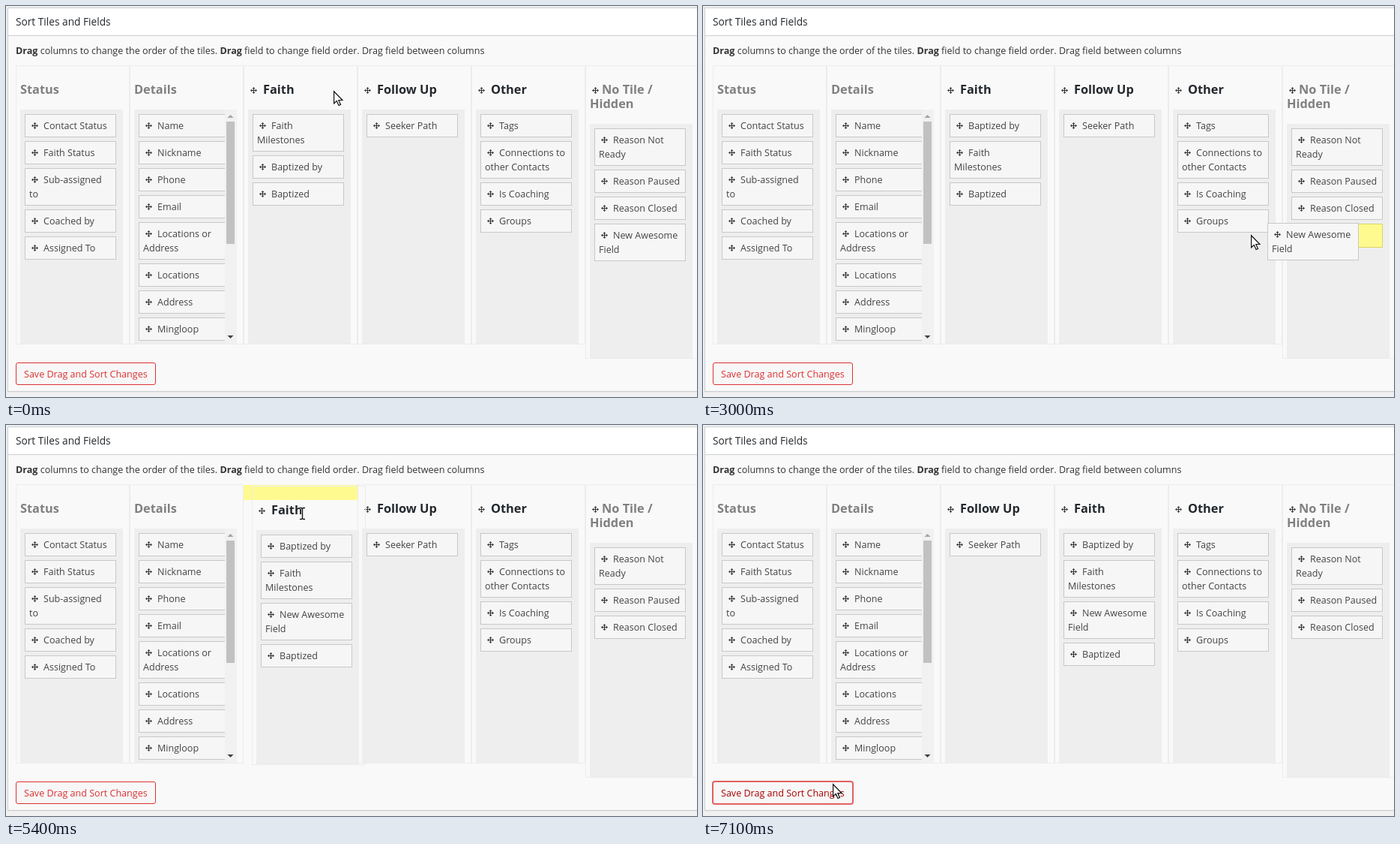
These frames come from a looping animation (922x521 px, 8.2 s). An HTML page:

```html
<!DOCTYPE html>
<html lang="en">
<head>
<meta charset="utf-8">
<title>Sort Tiles and Fields</title>
<style>
html, body { margin: 0; width: 100%; height: 100%; overflow: hidden; background: #f1f1f1; }
#stage { position: relative; width: 922px; height: 521px; overflow: hidden; background: #f1f1f1;
  font: 12.55px/19px "Open Sans", "Noto Sans", sans-serif; color: #444; }
#stage div, #stage span, #stage svg { position: absolute; box-sizing: border-box; white-space: nowrap; }
#stage svg { overflow: visible; }
.panel { left: 2px; top: 2px; width: 960px; height: 512px; background: #f9f9f9;
  border: 1px solid #ccd0d4; box-shadow: 0 1px 1px rgba(0,0,0,.04); }
.head { left: 0; top: 0; width: 100%; height: 37px; background: #fff; border-bottom: 1px solid #ccd0d4; }
.title { font-size: 13.7px; color: #23282d; }
.intro { color: #333; }
.column { width: 152px; border: 1px solid #ececec; }
.list { left: 5px; width: 137px; height: 312px; background: #eee; }
.heading { font-size: 16.35px; font-weight: 700; color: #23282d; }
.grey { color: #808080; }
.field { width: 122px; background: #f6f6f6; border: 1px solid #c8c8c8; }
.gap { width: 122px; height: 32px; background: #fffa90; border: 1px solid #dad55e; }
.colgap { top: 80px; width: 152px; height: 20px; background: #fffa90; }
.bar { left: 292px; top: 138px; width: 16px; height: 312px; background: #f1f1f1; z-index: 2; }
.thumb { left: 2px; top: 16px; width: 11px; height: 163px; background: #c1c1c1; }
.button { left: 13px; top: 475px; width: 187px; height: 30px; background: #f7f7f7; color: #dc3232;
  border: 1px solid #dc3232; border-radius: 3px; }
.button.hover { color: #a00; border-color: #e2605f; box-shadow: 0 0 0 1px #e2605f; }
.pointer { z-index: 20; }
</style>
</head>
<body>
<div id="stage"></div>
<script>
const LOOP = 8200, STEP = 100, LAG = 50;
const LEFT = 13, TOP = 79, PITCH = 152;
const stage = document.getElementById('stage');

function add(parent, cls, html = '', tag = 'div') {
  const el = document.createElement(tag);
  el.className = cls;
  el.innerHTML = html;
  return parent.appendChild(el);
}
function place(el, x, y, z = 1) {
  el.style.left = Math.round(x) + 'px';
  el.style.top = Math.round(y) + 'px';
  el.style.zIndex = z;
  return el;
}
const show = (el, on) => { el.style.display = on ? 'block' : 'none'; };
const label = (parent, text, x, y, cls = '') => place(add(parent, cls, text, 'span'), x, y);

const moveIcon = (x, y) =>
  `<svg width="9" height="9" style="left:${x}px;top:${y}px"><path d="M4.5 1v7M1 4.5h7" stroke="#333"/>` +
  '<path d="M4.5 0l2 2.2h-4zM4.5 9l2-2.2h-4zM0 4.5l2.2-2v4zM9 4.5l-2.2-2v4z" fill="#333"/></svg>';

// Static page
const panel = add(stage, 'panel');
add(panel, 'head');
label(stage, 'Sort Tiles and Fields', 13, 11, 'title');
label(stage, '<b>Drag</b> columns to change the order of the tiles. <b>Drag</b> field to change ' +
  'field order. Drag field between columns', 13, 50, 'intro');
const button = add(stage, 'button');
label(button, 'Save Drag and Sort Changes', 10, 5);

// Columns and their fields; "|" breaks a line
function makeColumn(title, style, names) {
  const el = add(stage, 'column');
  const lines = title.split('|');
  const extra = (lines.length - 1) * 19;
  el.style.height = 372 + extra + 'px';
  add(el, 'list').style.top = 58 + extra + 'px';
  if (style.icon) add(el, '', moveIcon(8, 28));
  lines.forEach((text, i) =>
    label(el, text, i ? 5 : style.x, 22 + i * 19, 'heading ' + (style.grey ? 'grey' : '')));
  return { el, top: 65 + extra, fields: names.map(makeField) };
}
function makeField(name) {
  const el = add(stage, 'field', moveIcon(8, 10));
  const lines = name.split('|');
  const height = 12 + 19 * lines.length;
  el.style.height = height + 'px';
  lines.forEach((text, i) => label(el, text, i ? 5 : 24, 5 + i * 19));
  return { el, height };
}
const fixed = { x: 5, grey: true };
const open = { x: 25, icon: true };
const columns = {
  status: makeColumn('Status', fixed,
    ['Contact Status', 'Faith Status', 'Sub-assigned|to', 'Coached by', 'Assigned To']),
  details: makeColumn('Details', fixed,
    ['Name', 'Nickname', 'Phone', 'Email', 'Locations or|Address', 'Locations', 'Address', 'Mingloop']),
  follow: makeColumn('Follow Up', open, ['Seeker Path']),
  other: makeColumn('Other', open, ['Tags', 'Connections to|other Contacts', 'Is Coaching', 'Groups']),
  hidden: makeColumn('No Tile /|Hidden', { x: 21, icon: true, grey: true },
    ['Reason Not|Ready', 'Reason Paused', 'Reason Closed']),
  faith: makeColumn('Faith', open, ['Baptized by', 'Baptized'])
};
add(stage, 'bar', '<div class="thumb"></div><svg width="16" height="312">' +
  '<path d="M3.5 11l4-4 4 4z" fill="#a3a3a3"/><path d="M3.5 301l4 4 4-4z" fill="#404040"/></svg>');

// Dragged things: slots are [time, column, index]; grab is the pointer offset inside the item
const movers = [
  { ...makeField('Faith|Milestones'), from: 1000, to: 2100, grab: [80, 19],
    slots: [[0, 'faith', 0], [1600, 'faith', 1]] },
  { ...makeField('New Awesome|Field'), from: 2900, to: 4400, grab: [61, 29],
    slots: [[0, 'hidden', 3], [3100, 'other', 4], [3300, 'follow', 1], [3500, 'faith', 3], [3800, 'faith', 2]] }
];
const tile = { from: 5400, to: 6200, grab: [54, 35], slots: [[0, 2], [5700, 3]] };
const gap = add(stage, 'gap');
const colGap = add(stage, 'colgap');

// Pointer
const arrow = add(stage, 'pointer', '<svg width="13" height="21"><path d="M.6 .8v16l3.7-3.4 2.7 6.1 2.5-1.1' +
  '-2.7-5.9h5.1z" fill="#fff" stroke="#111" stroke-width="1.2"/></svg>');
const beamPath = 'M1 .5h2.2l1.3 1 1.3-1H8M4.5 1.5v13M1 15.5h2.2l1.3-1 1.3 1H8';
const beam = add(stage, 'pointer', `<svg width="9" height="16" fill="none"><path d="${beamPath}" stroke="#fff" ` +
  `stroke-width="3"/><path d="${beamPath}" stroke="#111" stroke-width="1.4"/></svg>`);
const path = [
  [400, 437, 113], [1000, 409, 163], [1250, 406, 190], [1350, 407, 201], [1400, 407, 201],
  [1850, 410, 228], [2000, 410, 228], [2100, 420, 233], [2300, 720, 330], [2400, 834, 351],
  [2700, 834, 351], [2850, 846, 319], [2950, 814, 318], [3000, 731, 305], [3100, 665, 280],
  [3400, 505, 209], [3550, 446, 219], [3950, 392, 220], [4100, 392, 220], [4150, 394, 219],
  [4250, 394, 219], [4450, 392, 215], [5000, 371, 118], [5100, 371, 114], [5300, 371, 114],
  [5350, 382, 116], [5400, 395, 118], [5950, 578, 117], [6050, 572, 115], [6100, 570.5, 116],
  [6200, 568, 113], [6600, 400, 250], [6900, 215, 435], [7000, 182, 474], [7100, 173, 478]
];

function pointerAt(t) {
  const i = path.findIndex(key => key[0] > t);
  if (i < 0) return path[path.length - 1].slice(1);
  if (i === 0) return path[0].slice(1);
  const [a, b] = [path[i - 1], path[i]];
  const k = (t - a[0]) / (b[0] - a[0]);
  return [a[1] + (b[1] - a[1]) * k, a[2] + (b[2] - a[2]) * k];
}
const slotAt = (item, t) => item.slots.filter(s => s[0] <= t).pop();
const dragging = (item, t) => t >= item.from && t < item.to;
function heldAt(item, t) {
  const [x, y] = pointerAt(t - LAG);
  return [x - item.grab[0], y - item.grab[1]];
}

function draw(t) {
  const lists = {};
  for (const id in columns) lists[id] = [...columns[id].fields];
  for (const m of movers) {
    const [, id, index] = slotAt(m, t);
    lists[id].splice(index, 0, m);
  }
  const order = ['status', 'details', 'follow', 'other', 'hidden'];
  const slot = slotAt(tile, t)[1];
  order.splice(slot, 0, 'faith');

  const tileHeld = dragging(tile, t);
  show(colGap, tileHeld);
  colGap.style.left = LEFT + slot * PITCH + 'px';
  show(gap, false);

  order.forEach((id, i) => {
    const lifted = id === 'faith' && tileHeld;
    const [x, y] = lifted ? heldAt(tile, t) : [LEFT + i * PITCH, TOP];
    const z = lifted ? 5 : 1;
    place(columns[id].el, x, y, z);
    let top = y + columns[id].top;
    for (const f of lists[id]) {
      if (f.slots && dragging(f, t)) {
        show(gap, true);
        place(gap, x + 12, top, z);
        place(f.el, ...heldAt(f, t), 9);
        top += 37;
      } else {
        place(f.el, x + 12, top, z);
        top += f.height + 5;
      }
    }
  });

  const [px, py] = pointerAt(t);
  const text = t >= 5100 && t < 6200;
  show(arrow, !text);
  show(beam, text);
  place(arrow, px, py, 20);
  place(beam, px - 4.5, py - 8, 20);
  button.classList.toggle('hover', t >= 7000);
}

const start = performance.now();
function tick() {
  const t = (performance.now() - start) % LOOP;
  draw(Math.floor(t / STEP) * STEP);
  requestAnimationFrame(tick);
}
tick();
</script>
</body>
</html>
```
